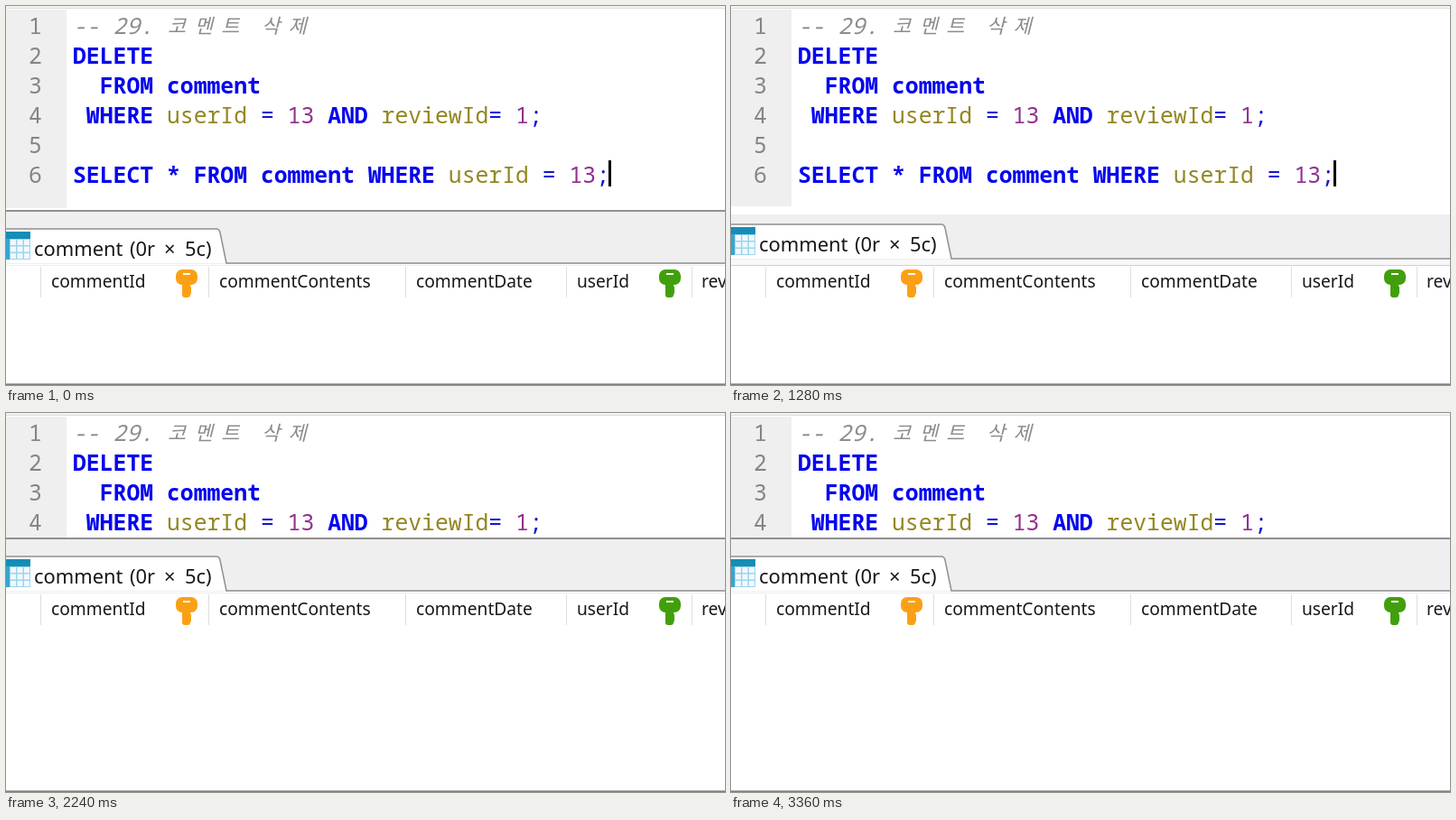
An HTML page with a canvas for the animation above (3.44 s loop, 796x420 px).

```html
<!DOCTYPE html>
<html lang="ko">
<head>
<meta charset="utf-8">
<title>SQL editor</title>
<style>
html, body { margin: 0; width: 100%; height: 100%; overflow: hidden; background: #fff; }
canvas { display: block; width: 796px; height: 420px; }
</style>
</head>
<body>
<canvas id="stage" width="796" height="420"></canvas>
<script>
const ctx = document.getElementById('stage').getContext('2d');
const W = 796, H = 420, LOOP = 3440, STEP = 80;
const COL = 14.85, ROW = 33, LEFT = 74, BASE = 31;
const MONO = '24.75px "Noto Sans Mono", "DejaVu Sans Mono", monospace';
const HANGUL = 'italic 22px "Noto Sans CJK KR", "Noto Sans CJK", sans-serif';
const UI = '"Noto Sans", "Open Sans", sans-serif';
const KEY = '#0505ee', NAME = '#938722', NUM = '#93308f', OP = '#1414d2', GRAY = '#858585';
const LINE = '#909090', INK = '#181818';

// row, column, text, colour
const code = [
  [1, 0, 'DELETE', KEY],
  [2, 2, 'FROM comment', KEY],
  [3, 1, 'WHERE', KEY], [3, 7, 'userId', NAME], [3, 14, '=', OP], [3, 16, '13', NUM],
  [3, 19, 'AND', KEY], [3, 23, 'reviewId', NAME], [3, 31, '=', OP], [3, 33, '1', NUM], [3, 34, ';', OP],
  [5, 0, 'SELECT * FROM comment WHERE', KEY], [5, 28, 'userId', NAME],
  [5, 35, '=', OP], [5, 37, '13', NUM], [5, 39, ';', OP]
];
const title = [[31, 'comment'], [137, '(0r'], [175, '×'], [198, '5c)']];
const fields = [[50, 'commentId'], [236, 'commentContents'], [454, 'commentDate'], [632, 'userId'], [770, 'reviewId']];
const dividers = [39, 225, 443, 621, 760];

// The splitter is dragged smoothly; the grid below repaints in jumps.
const drag = [[1200, 0], [1280, -5], [1600, -33], [2000, -64], [2160, -88]];
const repaints = [[0, 0], [1440, -19], [1600, -33], [1680, -37], [2080, -72], [2160, -88]];

function dragAt(t) {
  if (t <= drag[0][0]) return 0;
  for (let i = 1; i < drag.length; i++) {
    const [t0, a] = drag[i - 1], [t1, b] = drag[i];
    if (t <= t1) return Math.round(a + (b - a) * (t - t0) / (t1 - t0));
  }
  return drag[drag.length - 1][1];
}

const gridAt = t => repaints.filter(r => r[0] <= t).pop()[1];
const caretOn = t => t % 1040 < 560;

function rect(x, y, w, h, color) {
  ctx.fillStyle = color;
  ctx.fillRect(x, y, w, h);
}

function round(x, y, w, h, r) {
  ctx.beginPath();
  ctx.roundRect(x, y, w, h, r);
  ctx.fill();
}

function text(s, x, y, font, color) {
  ctx.font = font;
  ctx.fillStyle = color;
  ctx.fillText(s, x, y);
}

function hangul(s, col) {
  [...s].forEach((c, i) => text(c, LEFT + (col + 2 * i) * COL + 1, BASE - 1, HANGUL, '#8c8c8c'));
}

function drawEditor(t, bottom) {
  ctx.save();
  ctx.beginPath();
  ctx.rect(0, 0, W, bottom);
  ctx.clip();
  rect(0, 0, W, 2, '#f4f4f4');
  rect(0, 2, W, 1, '#dcdcdc');
  rect(0, 4, 67, 220, '#efefef');
  for (let i = 0; i < 6; i++) text(i + 1, 25, BASE + i * ROW, MONO, GRAY);

  text('-- 29.', LEFT, BASE, 'italic ' + MONO, '#8c8c8c');
  hangul('코멘트', 7);
  hangul('삭제', 14);

  for (const [row, col, s, color] of code) {
    text(s, LEFT + col * COL, BASE + row * ROW, (color === KEY ? 'bold ' : '') + MONO, color);
  }
  if (caretOn(t)) rect(667, 171, 3, 29, '#000');
  ctx.restore();
}

function drawIcon(y) {
  rect(0, y, 27, 31, '#9dd3ec');
  rect(0, y, 27, 8, '#168db5');
  rect(0, y + 8, 4, 23, '#37a5cf');
  for (let r = 0; r < 3; r++) {
    for (let c = 0; c < 3; c++) rect(5 + c * 7.5, y + 9 + r * 7.5, 6, 6, '#f0f9fe');
  }
}

function drawTab(dy) {
  const top = 247 + dy, foot = 285 + dy;
  const edge = new Path2D();
  edge.moveTo(0, top);
  edge.lineTo(233, top);
  edge.quadraticCurveTo(236, top, 237, top + 4);
  edge.lineTo(244, foot);
  ctx.fillStyle = '#fff';
  const body = new Path2D(edge);
  body.lineTo(0, foot);
  ctx.fill(body);
  edge.lineTo(W, foot);
  ctx.strokeStyle = LINE;
  ctx.lineWidth = 1.5;
  ctx.stroke(edge);
  drawIcon(250 + dy);
  for (const [x, s] of title) text(s, x, 277 + dy, '21.9px ' + UI, INK);
}

function drawKey(x, y, color) {
  ctx.fillStyle = color;
  round(x - 12, y, 24, 17, 7);
  round(x - 5, y + 12, 9, 19, 3);
  round(x, y + 18, 5, 10, 2);
  rect(x - 4, y + 4, 8, 2, '#fff');
}

function drawGrid(dy) {
  rect(0, 286 + dy, W, H, '#fff');
  for (const x of dividers) rect(x - 1, 289 + dy, 1, 34, '#dedede');
  for (const [x, s] of fields) text(s, x, 312 + dy, '19.2px ' + UI, INK);
  drawKey(200, 292 + dy, '#fba015');
  drawKey(735, 292 + dy, '#419f0c');
}

function draw(t) {
  const dy = dragAt(t), gridDy = gridAt(t);
  const lagging = dy !== gridDy;
  const split = 227 + dy;
  rect(0, 0, W, H, '#fff');
  drawEditor(t, split);
  drawGrid(gridDy);
  if (lagging) {
    rect(0, split, W, 9, '#fff');
    rect(0, split + 9, W, 50, '#efefef');
    rect(0, 286 + dy, W, gridDy - dy + 1, '#f8f8f8');
    rect(0, 287 + gridDy, W, 1, '#d0d0d0');
  } else {
    rect(0, split, W, 59, '#efefef');
    rect(0, split - 1, W, 2, LINE);
    rect(0, 287 + gridDy, W, 1, '#ececec');
  }
  drawTab(dy);
  rect(0, 418, W, 1, '#b0b0b0');
  rect(0, 419, W, 1, '#808080');
}

const start = performance.now();
function tick() {
  const t = (performance.now() - start) % LOOP;
  draw(Math.floor(t / STEP) * STEP);
  requestAnimationFrame(tick);
}
tick();
</script>
</body>
</html>
```
